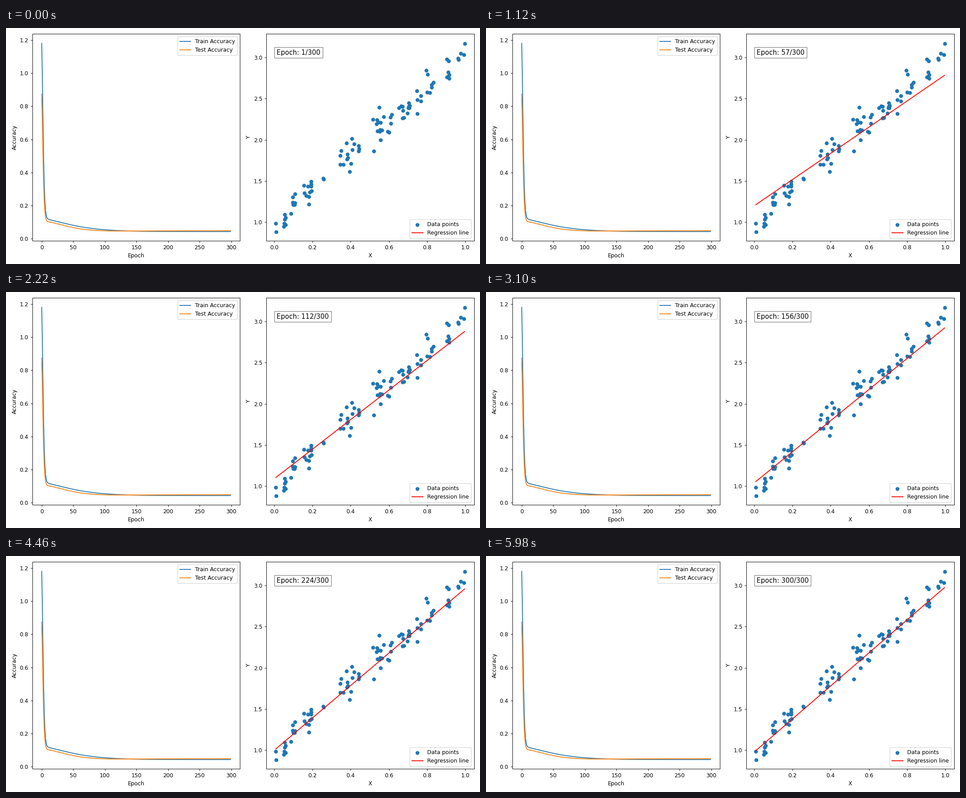
A matplotlib script for the animation above (6000 ms loop, 1058 by 529 pixels).

```python
import numpy as np
import matplotlib.pyplot as plt
from matplotlib.animation import FuncAnimation

EPOCHS = 300
WIDTH, HEIGHT = 1058, 529

# Ranges of x where the dots gather, with the number of dots in each.
BANDS = [
    (0.048, 0.06, 6), (0.083, 0.112, 7), (0.15, 0.195, 11), (0.24, 0.275, 2),
    (0.315, 0.45, 16), (0.517, 0.62, 16), (0.645, 0.71, 12), (0.739, 0.86, 11),
    (0.89, 0.93, 6), (0.96, 0.985, 3),
]
# The dots at both ends and the clearest outliers.
KEY_DOTS = [(0.008, 0.985), (0.0095, 0.884), (0.517, 2.25), (0.55, 2.395),
            (0.795, 2.845), (0.994, 3.03), (0.9965, 3.17)]


def make_dots():
    """Noisy samples of y = 1 + 2x."""
    rng = np.random.default_rng(4)
    x = np.concatenate([rng.uniform(*band) for band in BANDS])
    y = 1 + 2 * x + np.clip(rng.normal(0, 0.1, x.size), -0.18, 0.2)
    return np.vstack([np.column_stack([x, y]), KEY_DOTS]).T


def add_axes(left, right, top=13.2, bottom=477.4):
    """Axes placed by their edges in stage pixels."""
    return fig.add_axes([left / WIDTH, 1 - bottom / HEIGHT,
                         (right - left) / WIDTH, (bottom - top) / HEIGHT])


def decay(t, scale, power):
    return np.exp(-(t / scale) ** power)


def line_ends(t):
    """Heights of the regression line at the smallest and largest x."""
    slow = np.exp(-0.0112 * t)
    left = 0.98 + 0.436 * slow - 1.4 * 0.70 ** t
    right = 2.989 - 0.385 * slow - 2.1 * 0.77 ** t
    return left, right


plt.rcParams["font.family"] = "DejaVu Sans"
fig = plt.figure(figsize=(12, 6), dpi=88.1667)

t = np.arange(EPOCHS)
train = 0.0433 + 0.08 * decay(t, 61.3, 1.4) + 1.0567 * decay(t, 2.9, 1.5)
test = (0.0435 + 0.005 * (1 - decay(t, 150, 2)) + 0.063 * decay(t, 50, 1.7)
        + 0.7665 * decay(t, 2.7, 1.5))
ax_curve = add_axes(58.6, 522.4)
ax_curve.plot(t, train, label="Train Accuracy")
ax_curve.plot(t, test, label="Test Accuracy")
ax_curve.set(xlabel="Epoch", ylabel="Accuracy")
ax_curve.legend(loc="upper right")

ax_fit = add_axes(581.1, 1044.6)
x, y = make_dots()
ax_fit.scatter(x, y, label="Data points")
line, = ax_fit.plot([], [], color="red", label="Regression line")
ax_fit.set(xlabel="X", ylabel="Y", xlim=(-0.0416, 1.0459), ylim=(0.7727, 3.286))
ax_fit.legend(loc="lower right")
counter = ax_fit.text(0.05, 0.9, "", transform=ax_fit.transAxes, fontsize=12,
                      bbox=dict(facecolor="white", alpha=0.5))


def update(frame):
    line.set_data([x.min(), x.max()], line_ends(frame))
    counter.set_text(f"Epoch: {frame + 1}/{EPOCHS}")
    return line, counter


anim = FuncAnimation(fig, update, frames=EPOCHS, interval=20, repeat=True)
plt.show()
```
